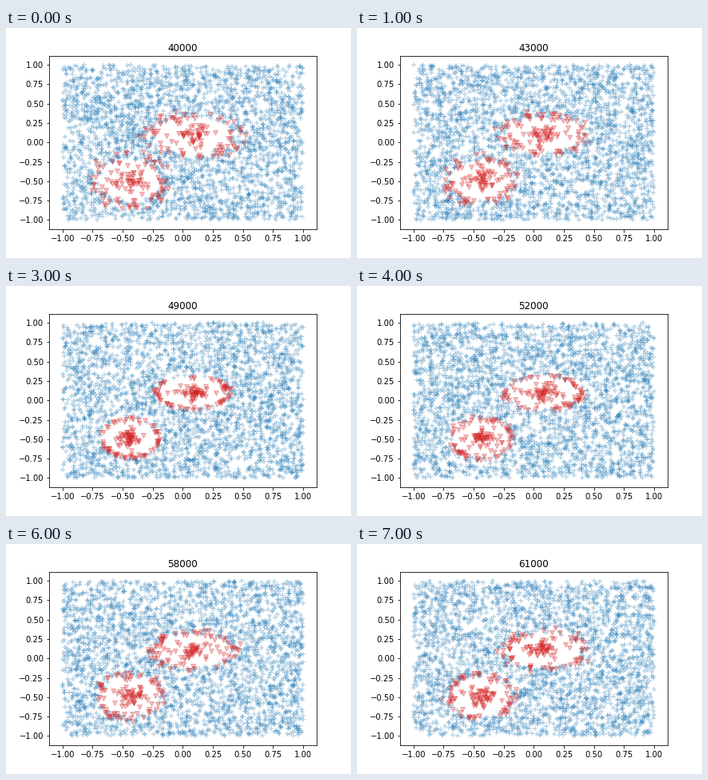
Recreate the animation shown at these times as a matplotlib script. Size 432 by 288 pixels, loop 8 s.

```python
import numpy as np
import matplotlib.pyplot as plt
from matplotlib.animation import FuncAnimation

plt.rcParams["font.family"] = "DejaVu Sans"

FRAMES, FIRST, STEP = 8, 40000, 3000
N_BLUE, N_CORE, N_RING = 3200, 58, 62

# center and tightest radius of each cluster
CLUSTERS = [
    (np.array([.08, .10]), np.array([.31, .22])),
    (np.array([-.44, -.49]), np.array([.245, .255])),
]

fig, ax = plt.subplots(figsize=(6, 4), dpi=72)
fig.subplots_adjust(left=.125, right=.9, bottom=.125, top=.88)


def looseness(i):
    """Clusters tighten up to the fourth step, then relax a little."""
    return np.interp(i, [0, 3, 5, 7], [1, 0, .4, .5])


def cluster(rng, center, radius, loose):
    """Dense core surrounded by a loose ring."""
    core = rng.laplace(scale=.17 + .08 * loose, size=(N_CORE, 2)).clip(-.8, .8)
    angle = rng.uniform(0, 2 * np.pi, N_RING)
    reach = rng.normal(.96, .05 + .09 * loose, N_RING).clip(.75, 1.2)
    ring = (reach * [np.cos(angle), np.sin(angle)]).T
    return center + radius * np.vstack([core, ring])


def draw(i):
    rng = np.random.default_rng(100 + i)
    loose = looseness(i)
    blue = rng.uniform(-1, 1, (N_BLUE, 2))
    red = []
    for center, tight in CLUSTERS:
        radius = tight * (1 + .27 * loose)
        distance = np.hypot(*((blue - center) / radius).T)
        blue = blue[distance > .95 - .11 * loose]
        red.append(cluster(rng, center, radius, loose))

    ax.clear()
    ax.scatter(*blue.T, marker="+", color="tab:blue", alpha=.3)
    ax.scatter(*np.vstack(red).T, marker="v", color="tab:red", alpha=.3)
    ax.set_xticks(np.linspace(-1, 1, 9))
    ax.set_yticks(np.linspace(-1, 1, 9))
    ax.set_xlim(-1.112, 1.112)
    ax.set_ylim(-1.12, 1.12)
    ax.set_title(str(FIRST + STEP * i))


anim = FuncAnimation(fig, draw, frames=FRAMES, init_func=lambda: None,
                     interval=1000, repeat=True, repeat_delay=0)
plt.show()
```
